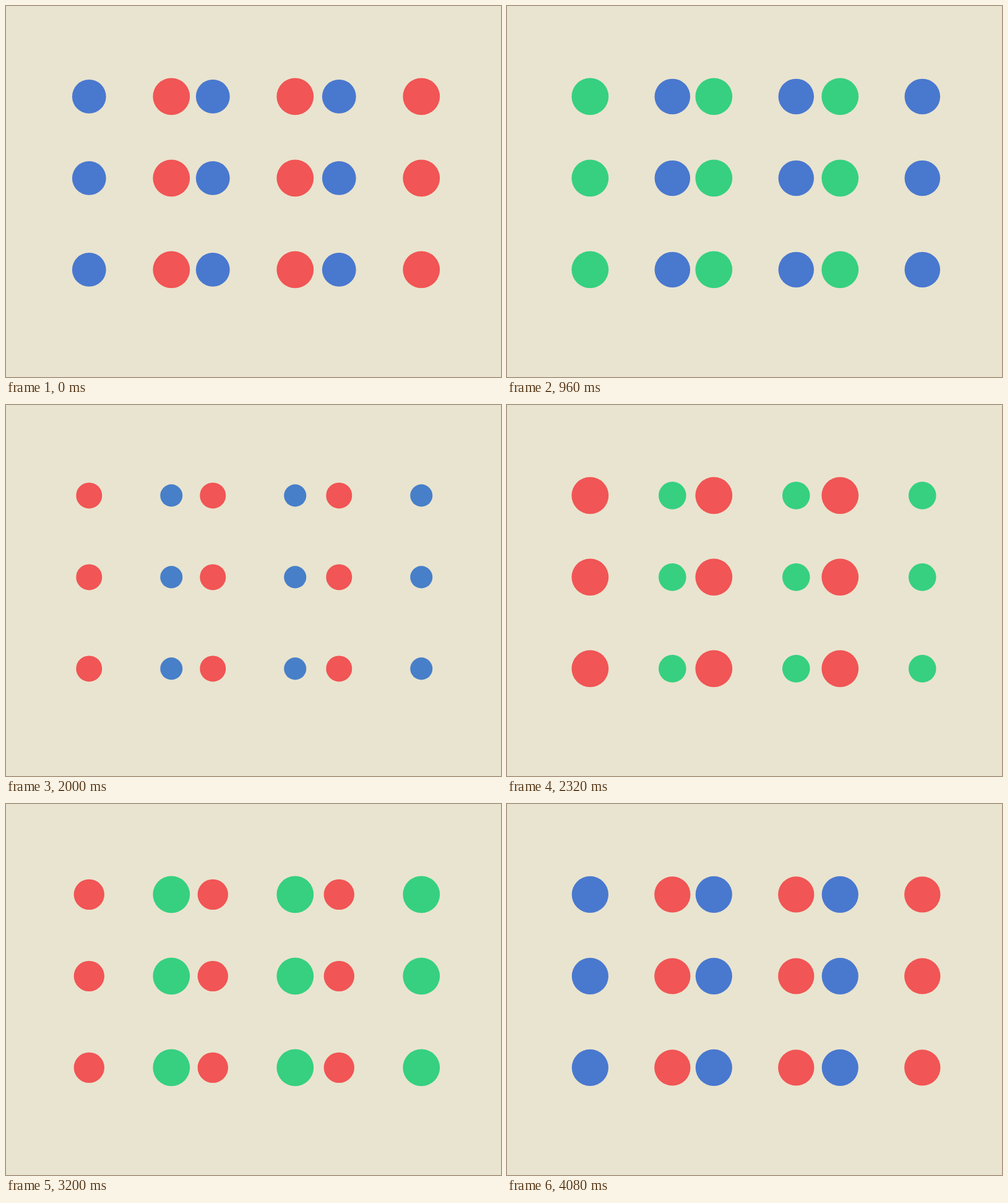
Animation of 800 by 600 pixels, one loop 4160 ms. Source, as an HTML page with a canvas:

```html
<!DOCTYPE html>
<html lang="en">
<head>
<meta charset="utf-8">
<title>Pulsing dots</title>
<style>
  html, body { margin: 0; width: 100%; height: 100%; overflow: hidden; background: #e9e4cf; }
  canvas { display: block; }
</style>
</head>
<body>
<canvas id="stage" width="800" height="600"></canvas>
<script>
const ctx = document.getElementById('stage').getContext('2d');
const LOOP = 4160, STEP = 80;
const BIG = 29.9, SMALL = 16;
const BLUE = [73, 120, 207], GREEN = [54, 208, 128], RED = [241, 85, 85];
const ROWS = [146.4, 278.4, 426.4];

// Each dip: start time, time to shrink (and again to grow), colour before, colour after.
const groups = [
  { cols: [134.3, 334.3, 538.3],
    dips: [[-121, 434, BLUE, GREEN], [1362, 453, GREEN, RED], [3013, 445, RED, BLUE]] },
  { cols: [267.3, 467.3, 671.3],
    dips: [[152, 445, RED, BLUE], [1666, 445, BLUE, GREEN], [3235, 456, GREEN, RED]] }
];

const clamp = v => Math.max(0, Math.min(1, v));
const mix = (a, b, k) => a.map((v, i) => Math.round(v + (b[i] - v) * k));

// State follows the dip that started most recently.
function dotAt(dips, t) {
  const [u, from, to] = dips
    .map(([start, span, a, b]) => [((t - start + LOOP) % LOOP) / span, a, b])
    .reduce((p, q) => (q[0] < p[0] ? q : p));
  const depth = u < 2 ? (1 - Math.cos(Math.PI * u)) / 2 : 0;
  return {
    r: BIG + (SMALL - BIG) * depth,
    color: `rgb(${mix(from, to, clamp((u - 0.72) / 0.377))})`
  };
}

function draw(t) {
  ctx.fillStyle = '#e9e4cf';
  ctx.fillRect(0, 0, 800, 600);
  for (const { cols, dips } of groups) {
    const { r, color } = dotAt(dips, t);
    ctx.fillStyle = color;
    for (const y of ROWS) {
      for (const x of cols) {
        ctx.beginPath();
        ctx.arc(x, y, r, 0, Math.PI * 2);
        ctx.fill();
      }
    }
  }
}

const begin = performance.now();
function tick() {
  const t = (performance.now() - begin) % LOOP;
  draw(Math.floor(t / STEP) * STEP);
  requestAnimationFrame(tick);
}
tick();
</script>
</body>
</html>
```
